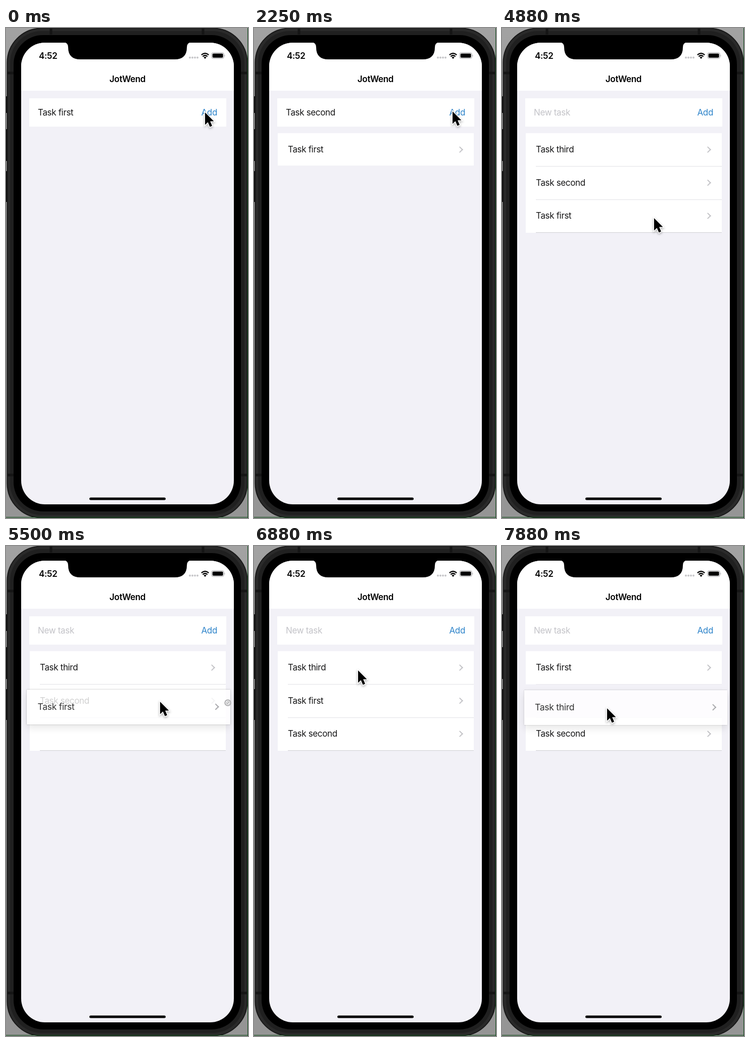
Recreate the animation shown at these times as an HTML page. Size 479 px wide and 969 px high, loop 8 s.

```html
<!DOCTYPE html>
<html lang="en">
<head>
<meta charset="utf-8">
<title>Task list</title>
<style>
  html, body { margin: 0; width: 100%; height: 100%; overflow: hidden; background: #9c9c9c; }
  body { font: 17px/24px Inter, "Liberation Sans", sans-serif; letter-spacing: -.02em; color: #161617; }
  #stage { position: relative; width: 479px; height: 969px; overflow: hidden; }
  #stage div, #stage svg { position: absolute; box-sizing: border-box; white-space: nowrap; }
  .bold { font-weight: 600; color: #000; }

  .field { left: 46px; top: 139px; width: 390px; height: 56px; background: #fff; }
  #entry { left: 17px; top: 16px; }
  #entry.empty { color: #c3c3c8; }
  .add { right: 18px; top: 16px; color: #2e84ca; }

  .list { left: 46.5px; top: 208px; width: 388px; overflow: hidden; background: #fff; }
  .line { left: 20px; right: 0; height: 1px; background: #e1e1e5; }
  .gap { left: 0; top: 0; width: 388px; height: 65.5px; background: #f2f1f7; }
  .row, .lift { left: 0; top: 0; width: 388px; height: 65.5px; padding: 20px 20.5px; }
  .row::after, .lift::after {
    content: ""; position: absolute; left: 356px; top: 28px; width: 9px; height: 9px;
    box-sizing: border-box; border: solid #c3c3c7; border-width: 2px 2px 0 0; transform: rotate(45deg);
  }
  .lift {
    left: 46.5px; top: 208px; opacity: 0; color: #333; background: rgba(255, 255, 255, .8);
    box-shadow: 0 0 2px rgba(0, 0, 0, .3), 0 6px 14px rgba(0, 0, 0, .1);
  }
  .lift::after { border-color: #aaaaae; }

  .add, .list, .gap, .row, .lift, .badge, .cursor { animation: 8s ease-in-out infinite; }
  .add { animation-name: press; }
  .list { animation-name: grow; }
  .gap { animation-name: gap; }
  .one { animation-name: one; }
  .two { animation-name: two; }
  .three { animation-name: three; }
  .lift.a { animation-name: liftA; }
  .lift.b { animation-name: liftB; }
  #stage .badge { left: -7px; top: -7px; animation-name: badge; animation-timing-function: step-end; }
  #stage .cursor { left: -3px; top: -3px; animation-name: cursor; filter: drop-shadow(0 2px 2px rgba(0, 0, 0, .3)); }

  @keyframes press {
    0%, 1.2%, 6%, 28.4%, 33%, 43%, 48%, 100% { opacity: 1; }
    2%, 3.4%, 29.2%, 30.5%, 43.6%, 45% { opacity: .3; }
  }
  @keyframes grow {
    0%, 3.7% { height: 0; }
    6.2%, 30.6% { height: 64px; }
    33.8%, 45% { height: 130.5px; }
    48.1%, 100% { height: 197px; }
  }
  @keyframes gap {
    0%, 86.9% { opacity: 0; transform: none; }
    87%, 100% { opacity: 1; }
    93.7% { transform: none; }
    97.3%, 100% { transform: translateY(65.5px); }
  }
  @keyframes one {
    0%, 3.7% { opacity: 0; }
    6.2%, 63.2% { opacity: 1; }
    63.25%, 78.7% { opacity: 0; }
    78.75%, 100% { opacity: 1; }
    0%, 30.6% { transform: none; }
    33.8%, 45% { transform: translateY(65.5px); }
    48.1%, 64% { transform: translateY(131px); }
    70%, 93.7% { transform: translateY(65.5px); }
    97.3%, 100% { transform: none; }
  }
  @keyframes two {
    0%, 31.3% { opacity: 0; }
    34.4%, 100% { opacity: 1; }
    0%, 45% { transform: none; }
    48.1%, 69% { transform: translateY(65.5px); }
    72.5%, 100% { transform: translateY(131px); }
  }
  @keyframes three {
    0%, 46% { opacity: 0; }
    48.5%, 86.9% { opacity: 1; }
    86.95%, 100% { opacity: 0; }
  }
  @keyframes liftA {
    0%, 63.2% { opacity: 0; transform: translate(0, 131px); }
    63.25% { opacity: 1; transform: translate(0, 131px); }
    65% { transform: translate(1px, 129px) scale(1.037); }
    68.75% { transform: translate(1.5px, 77.5px) scale(1.037); color: #333; background: rgba(255, 255, 255, .8); }
    72% { transform: translate(3px, 62px) scale(1.037); }
    76.6% { transform: translate(.5px, 56.5px) scale(1.02); color: #777; background: #fff; }
    78.75% { opacity: 1; transform: translate(0, 65.5px); color: #161617; background: #fff; }
    78.8%, 100% { opacity: 0; transform: translate(0, 65.5px); }
  }
  @keyframes liftB {
    0%, 86.9% { opacity: 0; transform: none; }
    86.95% { opacity: 1; transform: none; }
    88.6% { transform: translate(4px, 2px) scale(1.037); }
    90.6% { transform: translate(4px, 23.5px) scale(1.037); }
    93.7% { transform: translate(4px, 62px) scale(1.037); }
    95.4% { transform: translate(4px, 76px) scale(1.037); }
    98.5%, 100% { opacity: 1; transform: translate(4px, 78.5px) scale(1.037); }
  }
  @keyframes badge {
    0%, 70.2%, 92%, 100% { opacity: 0; }
    67.5% { opacity: 1; transform: translate(439px, 310px); }
    89.4% { opacity: 1; transform: translate(442px, 217px); }
  }
  @keyframes cursor {
    0% { transform: translate(394px, 167px); }
    28.1%, 44% { transform: translate(393px, 165px); }
    47.5%, 50% { transform: translate(411px, 168px); }
    54.4% { transform: translate(335px, 370px); }
    57.5% { transform: translate(304px, 391px); }
    60.5%, 63% { transform: translate(301px, 376px); }
    68.75% { transform: translate(305px, 308px); }
    72%, 76.6% { transform: translate(307px, 294px); }
    81.3% { transform: translate(304px, 296px); }
    82.8%, 86% { transform: translate(206px, 246px); }
    90.6% { transform: translate(212px, 279px); }
    93.7% { transform: translate(210px, 308px); }
    95.4% { transform: translate(209px, 318px); }
    98.5%, 100% { transform: translate(208px, 321px); }
  }
</style>
</head>
<body>
<div id="stage">
  <svg width="479" height="969">
    <defs>
      <linearGradient id="wall" x2="0" y2="1">
        <stop offset="0" stop-color="#a2a2a2"/><stop offset="1" stop-color="#959595"/>
      </linearGradient>
      <clipPath id="screen"><rect x="30" y="29" width="421" height="913" rx="47"/></clipPath>
    </defs>
    <rect width="479" height="969" fill="url(#wall)"/>
    <path d="M0 135h4v33h-4zM0 200h4v63h-4zM0 283h4v61h-4z" fill="#0b0b0b"/>
    <rect x="2.5" y=".5" width="475" height="968" rx="68" fill="#2a2a2a" stroke="#191919" stroke-width="2"/>
    <rect x="8" y="6" width="464" height="957" rx="63" fill="#202020"/>
    <path d="M3 89h12M3 884h12M465 89h12M465 884h12M89 1v12M390 1v12" stroke="#151515" stroke-width="5"/>
    <rect x="15" y="14" width="450" height="942" rx="58"/>
    <g clip-path="url(#screen)">
      <rect x="30" y="29" width="421" height="913" fill="#f2f1f7"/>
      <rect x="30" y="29" width="421" height="95" fill="#fff"/>
    </g>
    <path d="M114 28Q123 29 123 38Q123 62 147 62H334Q358 62 358 38Q358 29 367 28Z"/>
    <g fill="#c6c6c9">
      <circle cx="364" cy="58.5" r="2"/><circle cx="369" cy="58.5" r="2"/>
      <circle cx="374" cy="58.5" r="2"/><circle cx="379" cy="58.5" r="2"/>
    </g>
    <path d="M386.8 53.2q7.2-6.4 14.4 0M389.4 56.3q4.6-4 9.2 0" fill="none" stroke="#000" stroke-width="2.3"/>
    <path d="M394 61l-2.7-2.8q2.7-2.3 5.4 0z"/>
    <rect x="406.8" y="48.8" width="24.6" height="11.6" rx="3.6" fill="none" stroke="#a2a2a5"/>
    <rect x="408.6" y="50.5" width="21" height="8.2" rx="2"/>
    <path d="M432.6 52.5q1.8 2 0 4z" fill="#a2a2a5"/>
    <rect x="165" y="928.5" width="151" height="5" rx="2.5"/>
    <path d="M478.5 0V969M0 967.5H479" stroke="#0c4a17"/>
  </svg>

  <div class="bold" style="left:65px;top:43px">4:52</div>
  <div class="bold" style="left:30px;top:89px;width:421px;text-align:center">JotWend</div>

  <div class="field">
    <div id="entry">Task first</div>
    <div class="add">Add</div>
  </div>

  <div class="list">
    <div class="line" style="top:65px"></div>
    <div class="line" style="top:130.5px"></div>
    <div class="line" style="top:196px;background:#cfcfd3"></div>
    <div class="gap"></div>
    <div class="row one">Task first</div>
    <div class="row two">Task second</div>
    <div class="row three">Task third</div>
  </div>

  <div class="lift a">Task first</div>
  <div class="lift b">Task third</div>

  <svg class="badge" width="14" height="14">
    <circle cx="7" cy="7" r="6.8" fill="#b5b5b7"/>
    <path d="M4.6 4.6l4.8 4.8" stroke="#fff" stroke-width="1.3"/>
    <circle cx="7" cy="7" r="3.7" fill="none" stroke="#fff" stroke-width="1.3"/>
  </svg>
  <svg class="cursor" width="28" height="40">
    <path d="M3 3V27.5L8.6 22.3L12.6 31.5L17 29.6L13.1 20.6H20.5Z" stroke="#fff" stroke-width="3" paint-order="stroke"/>
  </svg>
</div>
<script>
  const LOOP = 8000;
  const entry = document.getElementById('entry');

  // text, first word start and end, second word start and end, cleared
  const runs = [
    ['Task first', 0, 0, 0, 0, 250],
    ['Task second', 550, 1000, 1250, 1750, 2400],
    ['Task third', 2750, 3050, 3120, 3400, 3550],
  ];

  const ramp = (t, a, b) => t >= b ? 1 : Math.max(0, (t - a) / (b - a));

  function typed(t) {
    const run = runs.find(r => t >= r[1] && t < r[5]);
    if (!run) return '';
    const [text, a, b, c, d] = run;
    const n = 4 * ramp(t, a, b) + (text.length - 4) * ramp(t, c, d);
    return text.slice(0, Math.floor(n));
  }

  let start;
  function tick(now) {
    start ??= now;
    const text = typed((now - start) % LOOP);
    const shown = text || 'New task';
    if (entry.textContent !== shown) entry.textContent = shown;
    entry.classList.toggle('empty', !text);
    requestAnimationFrame(tick);
  }
  requestAnimationFrame(tick);
</script>
</body>
</html>
```
